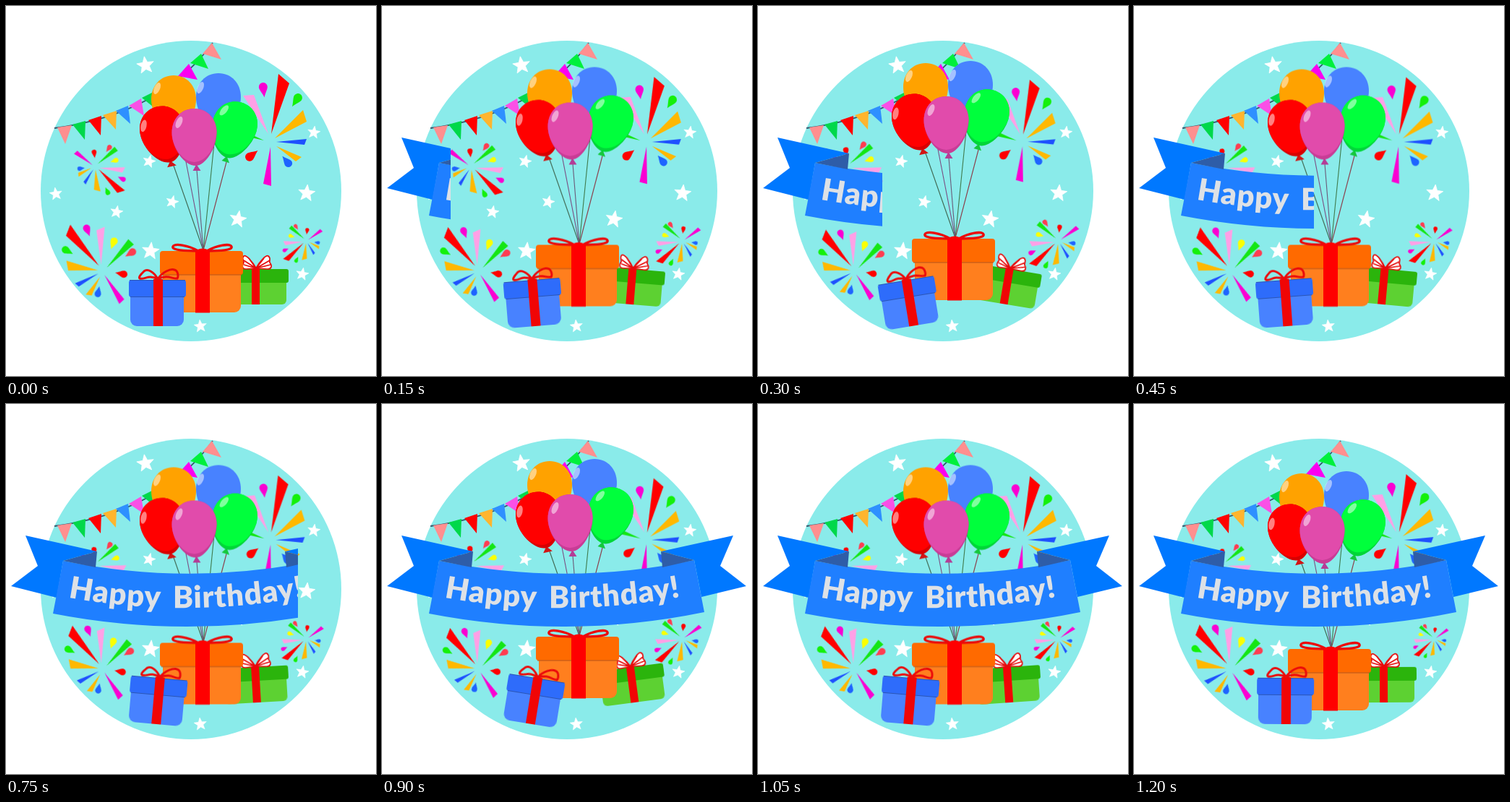
Animation of 512x512 px, one loop 1350 ms. Source, as an HTML page without scripts:

```html
<!DOCTYPE html>
<html lang="en">
<head>
<meta charset="utf-8">
<title>Happy Birthday</title>
<style>
html, body { margin: 0; width: 100%; height: 100%; overflow: hidden; background: #fff; }
svg { position: absolute; left: 0; top: 0; width: 512px; height: 512px; display: block; }
.reveal { position: absolute; left: 0; top: 0; height: 512px; overflow: hidden; animation: reveal 1.35s infinite; }
text { font: 900 42px Lato, "Open Sans", sans-serif; letter-spacing: 1px; word-spacing: 7px; fill: #dde1e6; }

/* two held poses per key segment */
.float, .tilt, .fire { animation: 1.35s steps(2, end) infinite; }
.float { animation-name: float; }
.blue { animation-name: sway; transform-origin: 210px 411px; }
.green { animation-name: rock; transform-origin: 347px 380px; }
.fire { transform-origin: 0 0; }
.shrink { animation-name: shrink; }
.grow { animation-name: grow; }

@keyframes float {
  0%, 44.44%, 88.88%, 100% { transform: translateY(0); }
  22.22%, 66.66% { transform: translateY(-17px); }
}
@keyframes sway {
  0% { transform: rotate(0deg); }
  22.22% { transform: rotate(-9.3deg); }
  44.44% { transform: rotate(.8deg); }
  66.66% { transform: rotate(9.3deg); }
  88.88%, 100% { transform: rotate(.4deg); }
}
@keyframes rock {
  0% { transform: rotate(0deg); }
  22.22% { transform: rotate(9.5deg); }
  44.44% { transform: rotate(1deg); }
  66.66% { transform: rotate(-7.5deg); }
  88.88%, 100% { transform: rotate(-.2deg); }
}
@keyframes shrink {
  0% { transform: scale(1); }
  22.22% { transform: scale(calc(1 - var(--k))); }
  44.44% { transform: scale(calc(1 - .12 * var(--k))); }
  66.66% { transform: scale(calc(1 - 1.07 * var(--k))); }
  88.88%, 100% { transform: scale(calc(1 - .38 * var(--k))); }
}
@keyframes grow {
  0% { transform: scale(1); }
  22.22% { transform: scale(calc(1 + var(--k))); }
  44.44% { transform: scale(calc(1 - .18 * var(--k))); }
  66.66% { transform: scale(calc(1 + .68 * var(--k))); }
  88.88%, 100% { transform: scale(calc(1 - .45 * var(--k))); }
}
@keyframes reveal {
  0% { width: 0; animation-timing-function: step-end; }
  11.11% { width: 95px; animation-timing-function: steps(5, end); }
  66.65% { width: 481px; animation-timing-function: step-end; }
  66.66%, 100% { width: 512px; }
}
</style>
</head>
<body>
<svg viewBox="0 0 512 512">
  <defs>
    <path id="star" d="M0-10L2.6-3.4 9.6-3 4.2 1.4 6 8.2 0 4.5-6 8.2-4.2 1.4-9.6-3-2.6-3.4Z" stroke-linejoin="round"/>
    <path id="drop" d="M0 10C-2 4-6-1-6-4.500A6 6 0 0 1 6-4.500C6-1 2 4 0 10Z"/>
    <path id="egg" d="M0-39C18-39 31-25 31-6C31 16 15 40 2 40C-14 40-31 16-31-6C-31-25-18-39 0-39Z"/>
    <path id="lit" d="M0-39C18-39 31-25 31-6C29 14 18 34 0 35C-18 34-31 12-31-6C-31-25-18-39 0-39Z"/>
    <ellipse id="shine" rx="4" ry="8.500" fill="#fff" opacity=".5" transform="translate(-21 -20) rotate(24)"/>
    <g id="burst">
      <path d="M12-93L27-80 2-10Z" fill="#f00"/>
      <path d="M-37-63L-22-64-2-10Z" fill="#ffa0e6"/>
      <path d="M46-43L51-27 7-4Z" fill="#ffb800"/>
      <path d="M51-3L48 5 9 1Z" fill="#1e50ff"/>
      <path d="M36 28L44 22 9 7Z" fill="#ffb800"/>
      <path d="M-9 59L2 62 1 8Z" fill="#fa00d2"/>
      <path d="M-62-26L-66-14-8-1Z" fill="#14e614"/>
      <use href="#drop" transform="rotate(-7) translate(0 -71)" fill="#fa00d2"/>
      <use href="#drop" transform="rotate(33) translate(0 -67)" fill="#14f00a"/>
      <use href="#drop" transform="rotate(140) translate(0 -36) scale(.9)" fill="#1e64ff"/>
      <use href="#drop" transform="rotate(232) translate(0 -31)" fill="#f00"/>
      <use href="#drop" transform="rotate(274) translate(0 -54)" fill="#ff3c50"/>
      <use href="#drop" transform="rotate(311) translate(0 -48)" fill="#faff00"/>
    </g>
  </defs>

  <circle cx="256" cy="256" r="208" fill="#8aebea"/>

  <!-- bunting -->
  <path d="M67 169Q215 149 286 51" fill="none" stroke="#35566b" stroke-width="1.800"/>
  <g fill="#ff8f8f"><path d="M71 168L91 165 82 191Z"/><path d="M272 66L285 51 298 74Z"/></g>
  <g fill="#00f03c"><path d="M92 164L110 159 109 185Z" fill="#00d84a"/><path d="M188 127L206 118 208 143Z" fill="#00d84a"/><path d="M255 79L270 66 280 87Z"/></g>
  <path d="M114 158L132 152 131 179Z" fill="#f00"/>
  <path d="M134 151L153 145 152 171Z" fill="#ffb52e"/>
  <path d="M152 145L169 138 172 163Z" fill="#2e90ff"/>
  <path d="M170 138L187 128 191 152Z" fill="#fa50e6"/>
  <path d="M238 97L253 80 265 102Z" fill="#fa00f0"/>

  <g fill="#fff" stroke="#fff" stroke-width=".6">
    <use href="#star" transform="translate(193 82) rotate(-8) scale(1.230)"/>
    <use href="#star" transform="translate(198 215) rotate(14) scale(.9)"/>
    <use href="#star" transform="translate(426 175) rotate(8) scale(.9)"/>
    <use href="#star" transform="translate(416 259) rotate(6) scale(1.200)"/>
    <use href="#star" transform="translate(321 295) rotate(10) scale(1.200)"/>
    <use href="#star" transform="translate(230 271) rotate(14) scale(.9)"/>
    <use href="#star" transform="translate(153 285) rotate(10) scale(.9)"/>
    <use href="#star" transform="translate(69 260) rotate(-8) scale(.9)"/>
    <use href="#star" transform="translate(200 339) rotate(6) scale(1.230)"/>
    <use href="#star" transform="translate(269 443) rotate(-6) scale(.9)"/>
    <use href="#star" transform="translate(410 371) rotate(10) scale(.9)"/>
  </g>

  <!-- fireworks: one burst, turned and mirrored -->
  <g transform="translate(365 187)"><g class="fire shrink" style="--k:.087"><use href="#burst"/></g></g>
  <g transform="translate(134 366)"><g class="fire shrink" style="--k:.11"><use href="#burst" transform="rotate(-28) scale(-.83 .83)"/></g></g>
  <g transform="translate(124 222)"><g class="fire grow" style="--k:.15"><use href="#burst" transform="rotate(122) scale(.56)"/></g></g>
  <g transform="translate(415 325)"><g class="fire grow" style="--k:.26"><use href="#burst" transform="rotate(-121) scale(-.43 .43)"/></g></g>

  <g class="tilt green">
    <rect x="302" y="372" width="86" height="41" rx="6" fill="#5dd132"/>
    <rect x="299" y="364" width="92" height="19" rx="3" fill="#2bb40c"/>
    <path d="M340 362H351V413H340Z" fill="#f00505"/>
    <g fill="#fff" stroke="#e60a0a" stroke-width="1.700">
      <path d="M346 363C341 353 332 344 329 346C326 349 329 352 329 355C326 360 327 364 332 364Z"/>
      <path d="M346 363C351 353 360 344 363 346C367 349 364 352 365 355C369 360 367 364 362 364Z"/>
      <path d="M346 363L329 352M346 363L329 358M346 363L336 349M346 363L365 352M346 363L366 358M346 363L357 349" fill="none"/>
    </g>
  </g>

  <g class="float">
    <!-- strings -->
    <g fill="none" stroke-width="1.100">
      <path d="M232 221L273 338" stroke="#3f6650"/>
      <path d="M246 200L273 338" stroke="#7a4a80"/>
      <path d="M264 227L273 338" stroke="#6a5a78"/>
      <path d="M288 190L273 338" stroke="#3f7a4c"/>
      <path d="M305 216L273 338" stroke="#8a3c48"/>
    </g>
    <!-- balloons -->
    <g transform="translate(232 135)"><use href="#egg" fill="#ffa200"/><use href="#shine" transform="translate(-2 -1)"/></g>
    <g transform="translate(294 132)"><use href="#egg" fill="#4882ff"/><use href="#shine" transform="translate(-4 1)"/></g>
    <g transform="translate(217.500 177.500) rotate(-12)"><path d="M2 38L9 46H-4Z" fill="#d21414"/><use href="#egg" fill="#d80000"/><use href="#lit" fill="#f00"/><use href="#shine" transform="translate(-3 3)"/></g>
    <g transform="translate(315 171) rotate(16)"><path d="M1 38L7 46H-4Z" fill="#14c83c"/><use href="#egg" fill="#00d638"/><use href="#lit" fill="#00ff3c"/><use href="#shine" transform="translate(1 -2)"/></g>
    <g transform="translate(260.500 181)"><path d="M3 38L9 47H-2Z" fill="#b43c96"/><use href="#egg" fill="#c83c96"/><use href="#lit" fill="#e14bab"/><use href="#shine"/></g>
    <!-- orange gift -->
    <rect x="217" y="360" width="108" height="64" rx="9" fill="#ff7f1e"/>
    <rect x="213" y="339" width="115" height="33" rx="4" fill="#ff6a00"/>
    <path d="M215 372H326" stroke="#b4561e" stroke-width="1.200"/>
    <path d="M262 338H282V424.500H262Z" fill="#f00"/>
    <path d="M266 339C252 331 233 328 231 333C229 338 248 339 266 339M278 339C292 331 310 328 312 333C314 338 296 339 278 339" fill="none" stroke="#eb0a0a" stroke-width="3.400"/>
    <ellipse cx="272" cy="341" rx="9.500" ry="5.500" fill="#f00"/>
  </g>

  <g class="tilt blue">
    <rect x="172" y="392" width="74" height="51" rx="9" fill="#4882ff"/>
    <rect x="170" y="379" width="79" height="24" rx="4" fill="#2e6cfb"/>
    <path d="M171 379.500H248M172 402.500H247" stroke="#2a55b4"/>
    <path d="M204 378H217V443H204Z" fill="#f00505"/>
    <path d="M210 378C205 368 196 363 191 367C187 371 183 375 185 377C192 379 197 371 210 378C216 368 228 363 233 365C238 366 239 374 237 377C230 378 224 371 210 378" fill="none" stroke="#eb0a0a" stroke-width="3"/>
  </g>
</svg>

<div class="reveal">
  <svg viewBox="0 0 512 512">
    <path d="M27 182L126 204 79 217 70 268 7 252 44 224ZM486 182L386 204 432 216 442 267 504 252 468 224Z" fill="#0078ff"/>
    <path d="M79 217Q256 253 432 216L446 288Q256 327 65 290Z" fill="#1f7fff"/>
    <path d="M79 217L126 204 124 226ZM432 216L386 204 388 226Z" fill="#2e5da8"/>
    <path id="line" d="M86 267.500Q250 298 424 265" fill="none"/>
    <text><textPath href="#line">Happy Birthday!</textPath></text>
  </svg>
</div>
</body>
</html>
```
